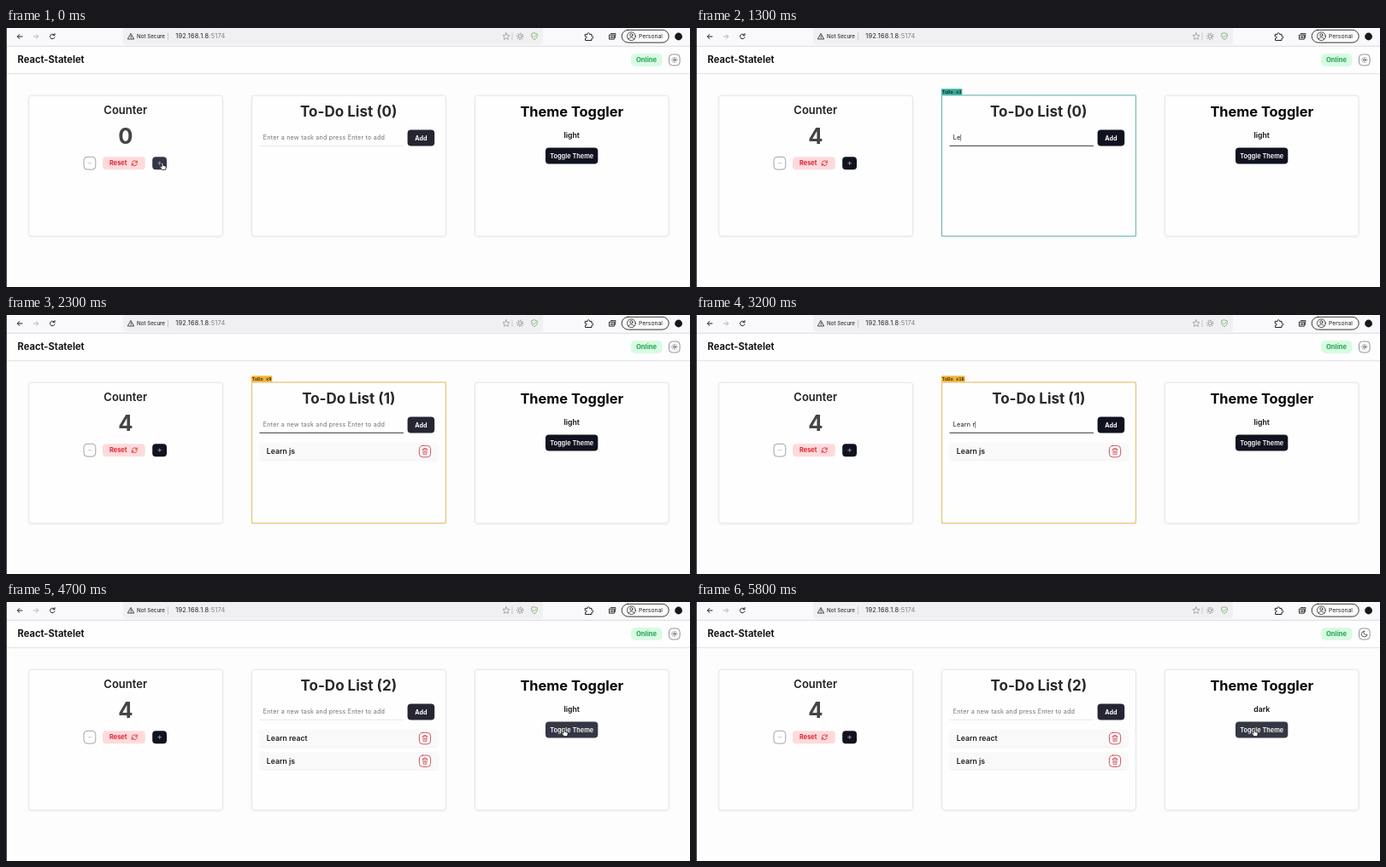
These frames come from a looping animation (800 by 304 pixels, 6 s). An HTML page:

```html
<!DOCTYPE html>
<html lang="en">
<head>
<meta charset="utf-8">
<title>State demo</title>
<style>
html, body { margin: 0; width: 100%; height: 100%; overflow: hidden; background: #fdfdfd; }
svg { display: block; width: 100vw; height: 100vh; }
text { font-family: Inter, "Open Sans", sans-serif; white-space: pre; }
.tag { font: 5.4px "DejaVu Sans Mono", "Noto Sans Mono", monospace; }
.mid { text-anchor: middle; }
.wide { letter-spacing: .03em; }
.line { fill: none; stroke-linecap: round; stroke-linejoin: round; }
</style>
</head>
<body>
<svg id="stage" viewBox="0 0 800 304" xmlns="http://www.w3.org/2000/svg">
  <defs>
    <filter id="soft" x="-10%" y="-30%" width="120%" height="170%">
      <feDropShadow dx="0" dy="0.6" stdDeviation="0.8" flood-color="#000" flood-opacity=".09"/>
    </filter>
    <g id="trash" class="line" stroke="#c9404a">
      <rect x="483.4" y="153.4" width="13.2" height="13.4" rx="4" fill="#fff" stroke-width=".9"/>
      <path d="M487 157.6h6M488.8 157.4v-1.1h2.4v1.1M487.7 157.8l.4 6h3.8l.4-6M489.2 159.5v2.6M490.8 159.5v2.6" stroke-width=".75"/>
    </g>
  </defs>
  <rect width="800" height="304" fill="#fdfdfd"/>

  <g id="toolbar">
    <rect width="800" height="21" fill="#f9f9fb"/>
    <rect x="137" y="-4" width="491" height="23.5" rx="4" fill="#f0f0f3"/>
    <path d="M0 21.4H800" stroke="#dedee1" stroke-width=".9"/>
    <g class="line" stroke="#222" stroke-width="1">
      <path d="M19 10h-5.6m2.4-2.4L13.3 10l2.5 2.4"/>
      <path d="M32.2 10h5.6m-2.4-2.4l2.5 2.4-2.5 2.4" stroke="#b5b5ba"/>
      <path d="M56.6 8.3a2.8 2.8 0 1 0 .4 2.6M57 6.6v2.1h-2.1"/>
      <path d="M146.2 6.8l3.5 6.2h-7zM146.2 9v1.9M146.2 12v.1" stroke-width=".8"/>
      <path d="M189.5 6v8M592 6v7.6" stroke="#b8b8be" stroke-width=".7"/>
      <path d="M585 5.8l1.2 2.6 2.8.3-2.1 1.9.6 2.8-2.5-1.4-2.5 1.4.6-2.8-2.1-1.9 2.8-.3z" stroke="#8b8b92" stroke-width=".7"/>
      <circle cx="601.3" cy="9.8" r="2" stroke="#888" stroke-width=".8"/>
      <circle cx="601.3" cy="9.8" r="3.6" stroke="#999" stroke-width="1.2" stroke-dasharray=".4 2.43"/>
      <path d="M618 5.8l3.4 1.2c.1 3.2-.9 5.3-3.4 6.7-2.5-1.4-3.5-3.5-3.4-6.7zM616.6 9.6l1.1 1.1 2-2.2" stroke="#7db36f" stroke-width=".9"/>
      <path d="M677.6 7.4h2.5c-.5-2.3 2.9-2.3 2.4 0h2.5v2.4c2.4-.5 2.4 2.9 0 2.4v2.3h-7.4v-2.4c2.2.3 2.2-2.7 0-2.3z"/>
      <path d="M707.4 6.6h5.6l-.8 5.2M705.9 8h5.4v5.2h-5.4zM707.2 9.8h2.8M707.2 11.4h2.8" stroke-width=".9"/>
      <rect x="720.2" y="2.3" width="55" height="14.8" rx="7.4" fill="#fcfcfd" stroke-width=".9"/>
      <circle cx="731.4" cy="9.7" r="4.9" stroke-width=".8"/>
      <circle cx="731.4" cy="8.2" r="1.6" stroke-width=".8"/>
      <path d="M728.2 13c.8-2.7 5.6-2.7 6.4 0" stroke-width=".8"/>
    </g>
    <circle cx="786.6" cy="10" r="4.4" fill="#17171c"/>
    <text x="153" y="12.2" font-size="6.2" font-weight="500" fill="#333">Not Secure</text>
    <text class="wide" x="198.3" y="12.4" font-size="7.4" fill="#222">192.168.1.8<tspan fill="#808086">:5174</tspan></text>
    <text x="740" y="12.3" font-size="6.8" fill="#222">Personal</text>
  </g>

  <g id="header">
    <rect y="22" width="800" height="31" fill="#fefefe" filter="url(#soft)"/>
    <path d="M0 53.4H800" stroke="#e4e4e7" stroke-width=".8"/>
    <text x="13.6" y="41.4" font-size="11.1" font-weight="700" fill="#161616">React-Statelet</text>
    <rect x="731" y="30" width="36.5" height="15" rx="5" fill="#d8fae3"/>
    <text class="mid" x="749" y="40.2" font-size="7.7" font-weight="700" fill="#24a652">Online</text>
    <rect x="775.5" y="31" width="12.6" height="13" rx="4" fill="#fff" stroke="#777" stroke-width=".8"/>
    <g id="sun" class="line" stroke="#333" stroke-width=".75">
      <circle cx="781.8" cy="37.4" r="1.3"/>
      <circle cx="781.8" cy="37.4" r="3" stroke-dasharray=".3 2.056"/>
    </g>
    <path id="moon" class="line" d="M781.4 34.2a3.4 3.4 0 1 0 3.7 4a2.8 2.8 0 0 1-3.7-4z" stroke="#333" stroke-width=".8"/>
  </g>

  <g id="cards"></g>

  <g id="counter">
    <text class="mid" x="139.7" y="101.4" font-size="13" font-weight="600" fill="#222">Counter</text>
    <text id="count" class="mid" x="139.8" y="136" font-size="25.5" font-weight="700" fill="#454549"></text>
    <rect x="91" y="151.3" width="13.8" height="14.8" rx="4" fill="#fff" stroke="#8c8c91" stroke-width=".8"/>
    <path d="M95.6 158.7h4.8" stroke="#bbbbc0" stroke-width=".8"/>
    <rect x="113" y="151.2" width="49.8" height="15" rx="4" fill="#fedadc"/>
    <text x="121" y="161.4" font-size="7.4" font-weight="700" fill="#dc2430">Reset</text>
    <path class="line" d="M147.4 158.2a2.9 2.9 0 0 1 5.2-1.2l.7.7v-2m0 2h-2M153.2 159.2a2.9 2.9 0 0 1-5.2 1.2l-.7-.7v2m0-2h2" stroke="#dc2430" stroke-width=".8"/>
    <rect id="plus" x="171.2" y="151.2" width="16.8" height="15" rx="4"/>
    <path d="M177.4 158.7h4.6M179.7 156.4v4.6" stroke="#a9aab4" stroke-width=".8"/>
  </g>

  <g id="todo">
    <text id="todoTitle" class="mid" x="400.8" y="103.9" font-size="17" font-weight="700" fill="#29292d"></text>
    <text id="field" class="wide" x="300.8" y="131.3" font-size="7.15"></text>
    <path id="caret" d="M0 124.7v8" stroke="#333" stroke-width=".6"/>
    <path id="under" d="M296.5 138.3H465"/>
    <rect id="add" x="469.6" y="119.6" width="31.6" height="19" rx="4"/>
    <text class="mid" x="485.4" y="131.8" font-size="7.2" font-weight="700" fill="#fff">Add</text>
    <g id="items"></g>
  </g>

  <g id="theme">
    <text class="mid" x="661.8" y="103.7" font-size="16.4" font-weight="700" fill="#080808">Theme Toggler</text>
    <text id="mode" class="mid" x="661.7" y="129.4" font-size="8.7" font-weight="600" fill="#111"></text>
    <rect id="toggle" x="631" y="140.4" width="61.3" height="19.2" rx="4"/>
    <text class="mid" x="661.7" y="152.9" font-size="7.4" font-weight="600" fill="#fff">Toggle Theme</text>
  </g>

  <path d="M.4 0V304" stroke="#111" stroke-width=".9"/>
  <g id="marks"></g>
  <path id="hand" d="M-.9 -2.6c0-1.3 1.7-1.3 1.7 0v2l2.5.6c.9.3 1 .9.8 1.7l-.6 2.8h-4l-2.2-3c-.5-.9.4-1.5 1-.9l.8.7z" fill="#fff" stroke="#111" stroke-width=".7"/>
  <path id="beam" class="line" d="M-1.3 -4q1.3 0 1.3 .8v6.4q0 .8-1.3.8M1.3 -4q-1.3 0-1.3 .8M0 3.2q0 .8 1.3 .8" stroke="#222" stroke-width=".7"/>
</svg>
<script>
const $ = id => document.getElementById(id);
const LOOP = 6000, STEP = 100;
const DARK = '#10121f', HOVER = '#343744', FADED = '#252632';
const cards = { counter: 26.8, todo: 287.7, theme: 548.4 };
const clicks = [100, 300, 500, 700];
const toggles = [4800, 5100, 5500];
const tasks = [
  { text: 'Learn js', start: 1150, gap: 130, done: 2200 },
  { text: 'Learn react', start: 2350, gap: 135, done: 4000 }
];

$('cards').innerHTML = Object.values(cards).map(x =>
  `<rect x="${x}" y="79.3" width="226.6" height="164.9" rx="3" fill="#fefefe" stroke="#e3e4e8" stroke-width=".9" filter="url(#soft)"/>`).join('');

const set = (id, attrs) => {
  for (const k in attrs) $(id).setAttribute(k, attrs[k]);
};
const show = (id, on) => set(id, { visibility: on ? 'visible' : 'hidden' });
const put = (id, s) => { if ($(id).textContent !== s) $(id).textContent = s; };
const clamp = v => Math.max(0, Math.min(1, v));
const ease = v => v * v * (3 - 2 * v);
const past = (list, t) => list.filter(v => v <= t).length;

// Update highlight: teal for few renders, amber for many
function mark(x, y, w, h, name, n) {
  const k = clamp((n - 3) / 6);
  const mix = (a, b) => Math.round(a + (b - a) * k);
  const color = `rgb(${mix(55, 240)},${mix(172, 180)},${mix(155, 55)})`;
  const label = n > 1 ? `${name} x${n}` : name;
  return `<rect x="${x}" y="${y}" width="${w}" height="${h}" fill="none" stroke="${color}" stroke-width=".75"/>
    <rect x="${x - .4}" y="${y - 7.5}" width="${label.length * 3.25 + 1.4}" height="7.2" fill="${color}"/>
    <text class="tag" x="${x + .3}" y="${y - 2.2}">${label}</text>`;
}
const markCard = (key, name, n) => mark(cards[key] - .2, 78.9, 226.8, 165.3, name, n);

function typed(t) {
  const task = tasks.find(k => t >= k.start && t < k.done);
  return task ? task.text.slice(0, Math.floor((t - task.start) / task.gap) + 1) : '';
}

function drawMarks(t, count, text) {
  let out = '';
  if (count && t < 1000) out += markCard('counter', 'Counter', count);
  if (t >= tasks[0].start && t < 4300) {
    const n = t < tasks[0].done ? text.length + 1
      : t < tasks[1].done ? 9 + text.length : 23;
    out += markCard('todo', 'ToDo', n);
  }
  if (toggles.some(v => t >= v && t < v + 250)) {
    out += markCard('theme', 'ThemeToggler', 1) + mark(775.5, 31, 12.6, 13, 'ThemeStatus', 1);
  }
  $('marks').innerHTML = out;
}

function drawPointer(t) {
  const there = ease(clamp((t - 750) / 250));
  const back = ease(clamp((t - 4300) / 350));
  const x = 183 + 197 * there + 273 * back;
  const y = 162 - 32 * there + 23 * back;
  const visible = t < tasks[0].start || t >= 4300;
  const overField = x > 297 && x < 465;
  const at = `translate(${x} ${y})`;
  set('hand', { transform: at });
  set('beam', { transform: at });
  show('hand', visible && !overField);
  show('beam', visible && overField);
  set('plus', { fill: x < 188 ? HOVER : DARK });
  set('toggle', { fill: x > 631 ? HOVER : DARK });
}

function draw(time) {
  const t = Math.floor((time % LOOP) / STEP) * STEP;
  const count = past(clicks, t);
  const text = typed(t);
  const list = tasks.filter(k => t >= k.done).reverse();
  const dark = past(toggles, t) % 2 === 1;
  const focus = t >= 1000 && t < 4700;

  put('count', String(count));
  put('todoTitle', `To-Do List (${list.length})`);
  put('field', text || 'Enter a new task and press Enter to add');
  set('field', { fill: text ? '#111' : '#707075' });
  set('caret', { transform: `translate(${301 + (text ? $('field').getComputedTextLength() : 0)} 0)` });
  show('caret', text);
  set('under', { stroke: focus ? '#222' : '#e1e1e4', 'stroke-width': focus ? .9 : .8 });
  set('add', { fill: text ? DARK : FADED });
  $('items').innerHTML = list.map((k, i) => `<g transform="translate(0 ${i * 26.6})">
    <rect x="296.8" y="150.4" width="208" height="19" rx="3" fill="#f9f9fa" filter="url(#soft)"/>
    <text x="304.8" y="163.2" font-size="8.7" font-weight="600" fill="#1c1c20">${k.text}</text>
    <use href="#trash"/></g>`).join('');
  put('mode', dark ? 'dark' : 'light');
  show('sun', !dark);
  show('moon', dark);
  drawMarks(t, count, text);
  drawPointer(t);
}

const begin = performance.now();
function tick() {
  draw(performance.now() - begin);
  requestAnimationFrame(tick);
}
tick();
</script>
</body>
</html>
```
